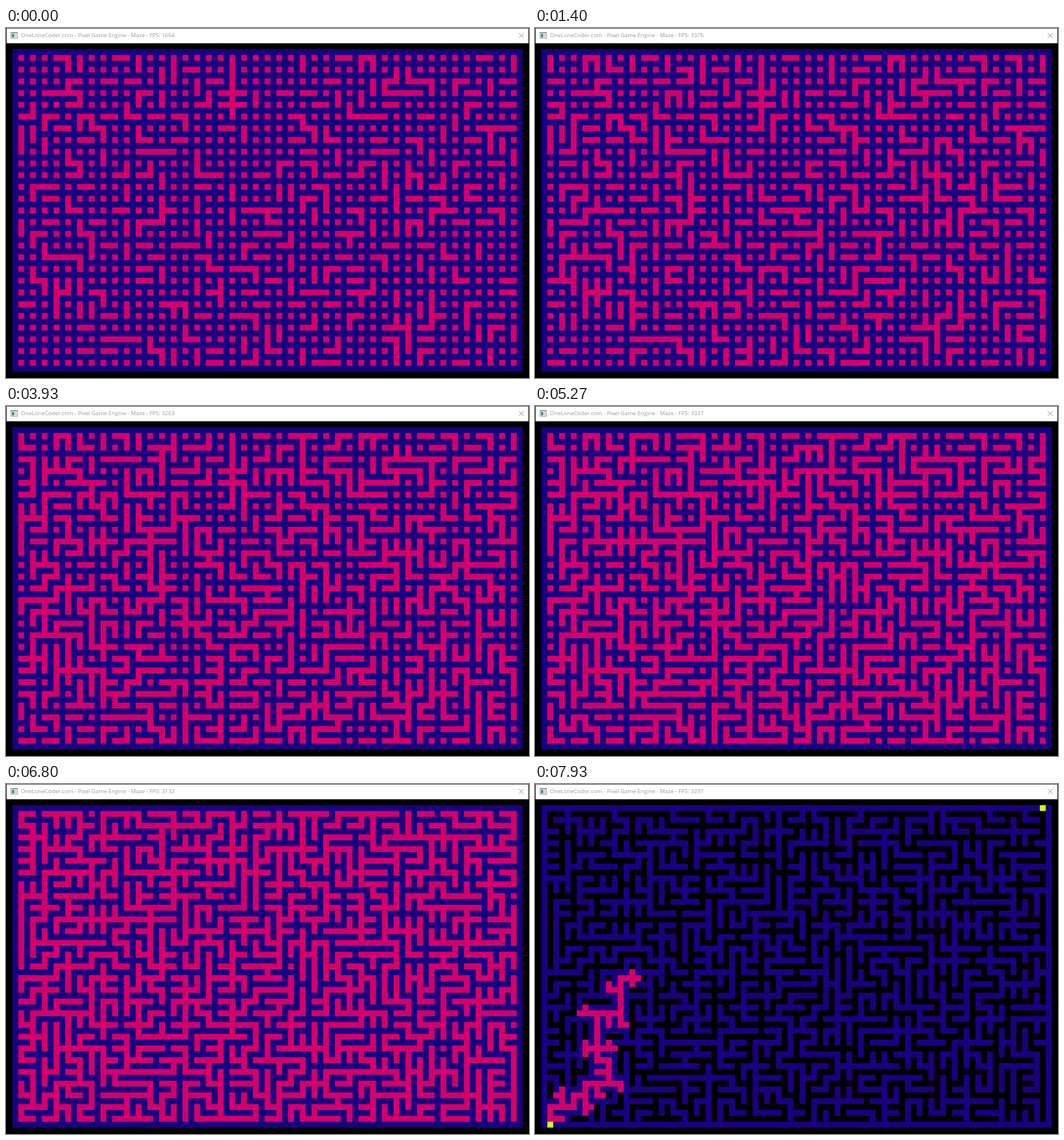
Animation of 915 by 612 pixels, one loop 8 s. Source, as an HTML page with a canvas:

```html
<!DOCTYPE html>
<html lang="en">
<head>
<meta charset="utf-8">
<title>Maze</title>
<style>
  html, body { margin: 0; width: 100%; height: 100%; overflow: hidden; background: #000; }
  canvas { position: absolute; left: 0; top: 0; width: 915px; height: 612px; display: block; }
  #title {
    position: absolute; left: 26px; top: 6px; white-space: pre;
    font: 9.8px/14px "Open Sans", "Noto Sans", sans-serif; color: #999;
  }
</style>
</head>
<body>
<canvas id="stage" width="892" height="597"></canvas>
<div id="title"></div>
<script>
const LOOP = 8000, TICK = 1000 / 15;
const COLS = 87, ROWS = 55, CELL = 10, LEFT = 11, TOP = 36;
const BLUE = '#19007f', PINK = '#d2006a', LIME = '#ccff00';
const START_LINKS = 380, BUILD_END = 6870;
const SIDE_DEPTH = 3;
const FPS = [1664, 3376, 3299, 3263, 3301, 3337, 3132, 3297];

// Corners of the main corridor the search follows: up, then right, alternately.
const CORRIDOR = '1,53 1,51 5,51 5,49 7,49 7,47 11,47 11,43 9,43 9,35 13,35 13,29';

const ctx = document.getElementById('stage').getContext('2d');
const title = document.getElementById('title');
const cellKey = (c, r) => c + r * COLS;

let seed = 20177;
function random() {
  seed = (seed + 0x6d2b79f5) | 0;
  let n = Math.imul(seed ^ (seed >>> 15), 1 | seed);
  n = (n + Math.imul(n ^ (n >>> 7), 61 | n)) ^ n;
  return ((n ^ (n >>> 14)) >>> 0) / 4294967296;
}

function traceCorridor() {
  const corners = CORRIDOR.split(' ').map(point => point.split(',').map(Number));
  let [c, r] = corners[0];
  const cells = [cellKey(c, r)];
  for (const [toC, toR] of corners) {
    while (c !== toC || r !== toR) {
      c += Math.sign(toC - c);
      r += Math.sign(toR - r);
      cells.push(cellKey(c, r));
    }
  }
  return cells;
}

// Kruskal's algorithm: the corridor is always open, the rest is random.
function buildLinks(corridor) {
  const links = [];
  for (let r = 1; r < ROWS - 1; r++) {
    for (let c = 1; c < COLS - 1; c++) {
      if ((c + r) % 2 === 0) continue;
      const step = c % 2 ? COLS : 1;
      const key = cellKey(c, r);
      const fixed = corridor.includes(key);
      links.push({ key, a: key - step, b: key + step, fixed, rank: fixed ? -1 : random() });
    }
  }
  links.sort((p, q) => p.rank - q.rank);

  const parent = Array.from({ length: COLS * ROWS }, (_, i) => i);
  const find = i => {
    while (parent[i] !== i) i = parent[i] = parent[parent[i]];
    return i;
  };
  const tree = links.filter(({ a, b }) => {
    const rootA = find(a), rootB = find(b);
    parent[rootA] = rootB;
    return rootA !== rootB;
  });
  tree.forEach((link, i) => {
    link.order = link.fixed ? random() * tree.length : i;
  });
  return tree.sort((p, q) => p.order - q.order).map(link => link.key);
}

// The search walks the corridor and probes a little way into each side branch.
function searchMaze(corridor, links) {
  const open = new Set(links);
  const main = new Set(corridor);
  const found = new Set();
  const isOpen = key => open.has(key) || (key % COLS % 2 && Math.floor(key / COLS) % 2);
  const probe = (key, depth) => {
    found.add(key);
    if (depth === SIDE_DEPTH) return;
    for (const step of [1, -COLS, -1, COLS]) {
      const next = key + step;
      if (isOpen(next) && !main.has(next) && !found.has(next)) probe(next, depth + 1);
    }
  };
  corridor.forEach(key => probe(key, 0));
  return [...found];
}

const corridor = traceCorridor();
const links = buildLinks(corridor);
const searched = searchMaze(corridor, links);

function fillCells(c, r, w = 1, h = 1) {
  ctx.fillRect(LEFT + c * CELL, TOP + r * CELL, w * CELL, h * CELL);
}

const fillKey = key => fillCells(key % COLS, Math.floor(key / COLS));

function rect(color, x, y, w, h) {
  ctx.fillStyle = color;
  ctx.fillRect(x, y, w, h);
}

function drawWindow() {
  rect('#000', 0, 0, 892, 597);
  rect('#555', 0, 0, 892, 1);
  rect('#fff', 1, 1, 890, 25);

  rect('#8a9296', 8, 7, 12, 11);
  rect('#fff', 9, 9, 10, 8);
  rect('#2f8886', 10, 10, 4, 6);
  rect('#c9d0d2', 15, 10, 3, 6);

  ctx.strokeStyle = '#888';
  ctx.beginPath();
  ctx.moveTo(874.5, 8.5);
  ctx.lineTo(883, 17);
  ctx.moveTo(883, 8.5);
  ctx.lineTo(874.5, 17);
  ctx.stroke();
}

function drawMaze(time) {
  const solving = time >= BUILD_END;
  const progress = Math.min(1, time / BUILD_END);
  const linkCount = Math.round(START_LINKS + (links.length - START_LINKS) * progress);

  ctx.fillStyle = BLUE;
  fillCells(0, 0, COLS, ROWS);
  ctx.fillStyle = solving ? '#000' : PINK;
  for (let r = 1; r < ROWS; r += 2) {
    for (let c = 1; c < COLS; c += 2) fillCells(c, r);
  }
  links.slice(0, linkCount).forEach(fillKey);

  if (solving) {
    ctx.fillStyle = PINK;
    const share = (time - BUILD_END) / (LOOP - TICK - BUILD_END);
    searched.slice(0, Math.round(searched.length * share)).forEach(fillKey);
    ctx.fillStyle = LIME;
    fillCells(1, ROWS - 1);
    fillCells(COLS - 2, 0);
  }
}

let shownTick = -1;
function frame() {
  const tick = Math.floor(((performance.now() % LOOP) + 3.4) / TICK) % 120;
  if (tick !== shownTick) {
    shownTick = tick;
    const time = tick * TICK;
    drawMaze(time);
    title.textContent = 'OneLoneCoder.com - Pixel Game Engine - Maze - FPS: ' +
      FPS[Math.floor(time / 1005)];
  }
  requestAnimationFrame(frame);
}

drawWindow();
frame();
</script>
</body>
</html>
```
